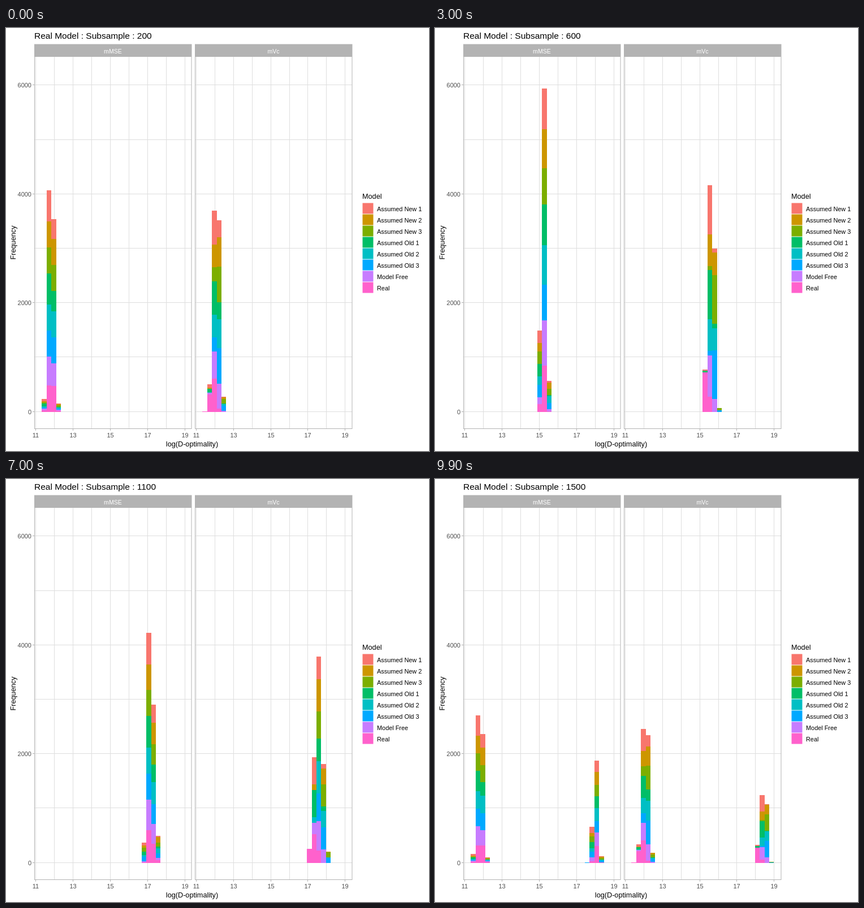
Write an HTML page that moves like this. It is 748 px wide and 748 px high and loops after 10000 ms.

```html
<!DOCTYPE html>
<html lang="en">
<head>
<meta charset="utf-8">
<title>D-optimality histograms</title>
<style>
  html, body { margin: 0; width: 100%; height: 100%; overflow: hidden; background: #fff; }
  svg { display: block; width: 100vw; height: 100vh; font-family: "Liberation Sans", Arial, sans-serif; }
  path { shape-rendering: crispEdges; }
  .title { font-size: 15.5px; }
  .heading { font-size: 12.7px; }
  .label { font-size: 10.9px; }
  .tick { font-size: 11px; fill: #4d4d4d; }
  .strip { font-size: 10.6px; fill: #fff; }
</style>
</head>
<body>
<svg id="chart" viewBox="0 0 748 748"></svg>
<script>
const svg = document.getElementById("chart");

// Stacking order, bottom first; old and new versions share a curve.
const models = [
  { name: "Real", colour: "#FF61CC", curve: "real" },
  { name: "Model Free", colour: "#C77CFF", curve: "free" },
  { name: "Assumed Old 3", colour: "#00A9FF", curve: "third" },
  { name: "Assumed Old 2", colour: "#00BFC4", curve: "second" },
  { name: "Assumed Old 1", colour: "#00BE67", curve: "first" },
  { name: "Assumed New 3", colour: "#7CAE00", curve: "third" },
  { name: "Assumed New 2", colour: "#CD9600", curve: "second" },
  { name: "Assumed New 1", colour: "#F8766D", curve: "first" }
];

// A normal curve in bin units whose mean grows with the log of the sample size
// and whose spread settles from a common width.
const growth = (start, slope, bend, settled) => u => ({
  mean: start + slope * u + bend * u * u,
  spread: mix(settled, .5, Math.exp(-2 * u))
});

const panels = [
  { name: "mMSE", curves: {
    real: growth(1.99, 12.15, -.02, .27),
    free: growth(1.92, 12.5, -.21, .33),
    first: growth(1.85, 12.4, -.17, .35),
    second: growth(2, 12.44, -.17, .45),
    third: growth(2, 12.36, -.16, .51) } },
  { name: "mVc", curves: {
    real: growth(2.22, 12.65, -.24, .27),
    free: growth(2.97, 12.84, -.245, .28),
    first: growth(2.765, 13, -.385, .27),
    second: growth(3.09, 12.86, -.24, .3),
    third: growth(3.32, 13.3, -.41, .28) } }
];
const BINS = 30, DRAWS = 1000, TAIL = 2.6, PANEL_SHIFT = 284;

function mix(a, b, p) { return a + (b - a) * p; }
const xBin = (edge, panel) => Math.round(63.4 + 8.4 * edge + PANEL_SHIFT * panel);
const yCount = count => Math.round(678.6 - .0962 * count);

function normalCdf(z) {
  if (Math.abs(z) > TAIL) return z > 0 ? 1 : 0;
  return 1 / (1 + Math.exp(-1.5976 * z - .07056 * z ** 3));
}

// Counts as [panel][bin][model].
function histogram(size) {
  const u = Math.log(size / 200);
  return panels.map(({ curves }) => Array.from({ length: BINS }, (_, bin) =>
    models.map(({ curve }) => {
      const { mean, spread } = curves[curve](u);
      const below = edge => normalCdf((edge - mean) / spread);
      return DRAWS * (below(bin + 1) - below(bin));
    })));
}

// Steps of 100 ms: the first three moves take four steps, the rest three.
const states = Array.from({ length: 14 }, (_, i) => {
  const arrive = 7 * i + Math.min(Math.max(i - 1, 0), 2);
  return { size: 200 + 100 * i, arrive, depart: arrive + (i ? 4 : 3), bars: histogram(200 + 100 * i) };
});

function add(tag, attrs, text) {
  const el = document.createElementNS("http://www.w3.org/2000/svg", tag);
  for (const key in attrs) el.setAttribute(key, attrs[key]);
  if (text) el.textContent = text;
  return svg.appendChild(el);
}
const label = (x, y, cls, text, anchor = "start", more = {}) =>
  add("text", { x, y, class: cls, "text-anchor": anchor, ...more }, text);
const line = (d, stroke) => add("path", { d, stroke, fill: "none" });

const title = label(50, 19, "title", " ");

panels.forEach(({ name }, panel) => {
  const left = 50.5 + PANEL_SHIFT * panel;
  add("rect", { x: left - .5, y: 28.5, width: 278.5, height: 21.5, fill: "#b3b3b3" });
  label(left + 138.5, 44.5, "strip", name, "middle");
  for (let i = 0; i < 9; i++) {
    const x = Math.floor(52.25 + 32.99 * i + 283.8 * panel) + .5;
    line(`M${x} 51V708`, "#dedede");
    if (i % 2 === 0) {
      line(`M${x} 709v3`, "#b3b3b3");
      label(x, 724, "tick", 11 + i, "middle");
    }
  }
  for (let count = 0; count <= 6000; count += 1000) {
    const y = yCount(count) - .5;
    line(`M${left} ${y}h277`, "#dedede");
    if (!panel && count % 2000 === 0) {
      line(`M47 ${y}h3`, "#b3b3b3");
      label(45, y + 4, "tick", String(count), "end");
    }
  }
});

const layers = models.map(({ colour }) => add("path", { fill: colour }));

panels.forEach((_, panel) => add("rect", {
  x: 50.5 + PANEL_SHIFT * panel, y: 50.5, width: 277.5, height: 658, fill: "none", stroke: "#b3b3b3"
}));

label(329, 740, "heading", "log(D-optimality)", "middle");
label(0, 0, "heading", "Frequency", "middle", { transform: "translate(17 379.5) rotate(-90)" });
label(630, 302, "heading", "Model");
[...models].reverse().forEach(({ name, colour }, i) => {
  add("rect", { x: 630.5, y: 309.5 + 20 * i, width: 19, height: 19, fill: colour });
  label(656, 324 + 20 * i, "label", name);
});

function draw(step) {
  const i = states.findLastIndex(s => s.arrive <= step);
  const from = states[i], to = states[(i + 1) % states.length];
  const end = to.arrive || 100;
  const p = Math.max(0, (step - from.depart) / (end - from.depart));
  const shapes = models.map(() => "");
  panels.forEach((_, panel) => {
    for (let bin = 0; bin < BINS; bin++) {
      const x = xBin(bin, panel), right = xBin(bin + 1, panel);
      let count = 0;
      models.forEach((_, m) => {
        const bottom = yCount(count);
        count += mix(from.bars[panel][bin][m], to.bars[panel][bin][m], p);
        const top = yCount(count);
        if (top < bottom) shapes[m] += `M${x} ${bottom}V${top}H${right}V${bottom}Z`;
      });
    }
  });
  layers.forEach((layer, m) => layer.setAttribute("d", shapes[m]));
  title.textContent = `Real Model : Subsample : ${from.size}`;
}

const start = performance.now();
let shown = -1;
function tick() {
  const step = Math.floor((performance.now() - start) / 100) % 100;
  if (step !== shown) draw(shown = step);
  requestAnimationFrame(tick);
}
tick();
</script>
</body>
</html>
```
